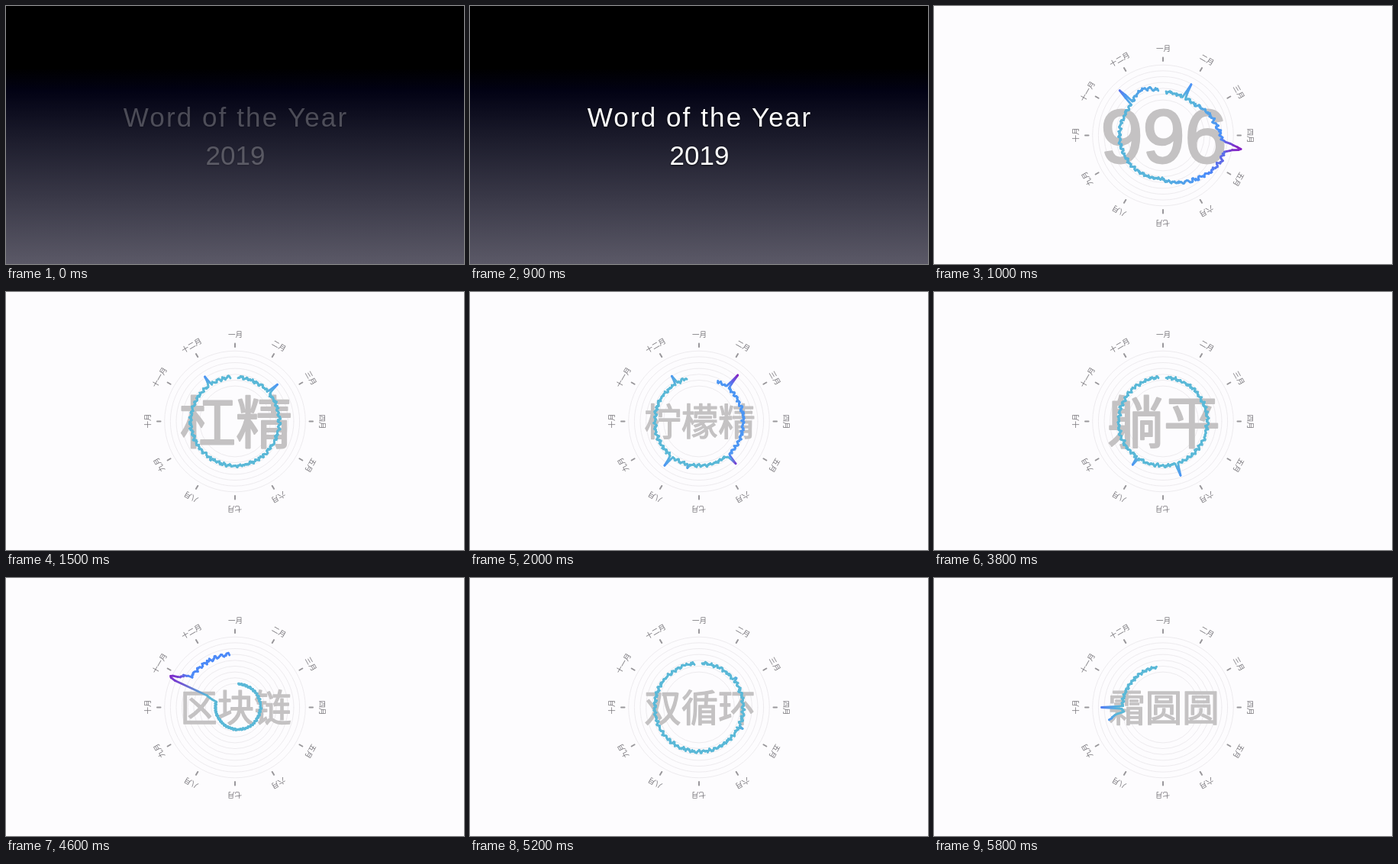
Animation, 600 px wide and 338 px high, one loop 5900 ms. Source, as an HTML page with a canvas:

```html
<!DOCTYPE html>
<html lang="zh">
<head>
<meta charset="utf-8">
<style>
html, body { margin: 0; width: 100%; height: 100%; overflow: hidden; background: #fdfcfe; }
canvas { display: block; width: 600px; height: 338px; }
</style>
</head>
<body>
<canvas id="stage"></canvas>
<script>
const LOOP = 5900, TICK = 100, INTRO = 1000, CX = 300, CY = 169.5;
const CJK = '"Noto Sans CJK SC", "Noto Sans CJK", sans-serif';
const LATIN = '"Liberation Sans", Arial, sans-serif';
const canvas = document.getElementById('stage');
const ctx = canvas.getContext('2d');
const scale = window.devicePixelRatio || 1;
canvas.width = 600 * scale;
canvas.height = 338 * scale;

const months = '一 二 三 四 五 六 七 八 九 十 十一 十二'.split(' ');

// Every star holds a word for one more tick.
const words = ('996 断舍离 内卷 夸夸群 打工人 杠精 彩虹屁 佛系** 柠檬精** 斜杠 盘他 社畜 种草 断层 带货* ' +
  '硬核** 上头** 真香 锦鲤 躺平 秃头 下沉** 台风** 区块链** 养生 新基建* 双循环 云养猫* ' +
  '早八人 直播间 小确幸 霜圆圆').split(' ');

// Peaks are [degrees, height, half width]; base and tint may depend on the angle.
const curves = {
  '996': { base: () => 57, lo: 55, hi: 97,
    peaks: [[29, 17], [112, 27, 70], [100, 22, 6], [316, 22, 2], [335, 10, 25]] },
  '柠檬精': { from: 25, to: 344, tint: a => a < 140 ? .4 : 0,
    peaks: [[40, 22], [139, 16], [194, 6], [218, 14], [329, 12]] },
  '硬核': { from: -6, to: 346, peaks: [[12, 11], [327, 3, 4], [345, 7]] },
  '台风': { peaks: [[221, 99]] },
  '区块链': { from: 8, rings: 9, lo: 45, hi: 93, peaks: [[296, 22, 9]],
    base: a => a < 294 ? 29.5 + 4 * Math.cos((a - 80) * Math.PI / 180) : 70 },
  '霜圆圆': { from: 257, to: 351, base: () => 53, hi: 100, peaks: [[257, 20, 7], [270, 29]] }
};

function rand(n) {
  const x = Math.sin(n * 12.9898 + 4.137) * 43758.5453;
  return x - Math.floor(x);
}

// A quiet year with two bursts; the last words only turn up in autumn.
function quietCurve(seed, time) {
  const from = time >= 5300 ? 250 : 4;
  const height = time >= 4900 ? 5 : 14;
  const peaks = [1, 2].map(i => [Math.round(from + 10 + rand(seed * 7 + i) * (330 - from)), height]);
  return { from, peaks };
}

function ramp(v) {
  const stops = [[90, 184, 215], [74, 142, 250], [132, 36, 196]];
  const t = Math.max(0, Math.min(1, v)) * 2, i = Math.min(1, Math.floor(t));
  const rgb = stops[i].map((c, k) => Math.round(c + (stops[i + 1][k] - c) * (t - i)));
  return `rgb(${rgb})`;
}

// One point per degree, with a weekly ripple and some daily noise.
function trace({ from = 4, to = 354, lo = 58, hi = 92, base = () => 58, tint = () => 0, peaks }, seed) {
  const points = [];
  for (let a = from; a <= to; a++) {
    let r = base(a);
    for (const [at, height, width = 1.5] of peaks) {
      r += height * Math.max(0, 1 - Math.abs(a - at) / width);
    }
    const ripple = .018 * Math.sin(a * Math.PI * 2 / 7) + .045 * (rand(seed * 400 + a) - .5);
    const angle = a * Math.PI / 180, wobbly = r * (1 + ripple);
    points.push({
      x: CX + wobbly * Math.sin(angle),
      y: CY - wobbly * Math.cos(angle),
      color: ramp((r - lo) / (hi - lo) + tint(a))
    });
  }
  return points;
}

let clock = INTRO;
const scenes = words.map((entry, i) => {
  const word = entry.replace(/\*/g, ''), time = clock;
  clock += TICK * (1 + entry.length - word.length);
  const curve = curves[word] || quietCurve(i + 1, time);
  return { time, word, rings: curve.rings || 7, points: trace(curve, i + 1) };
});

function line(x1, y1, x2, y2, style, width) {
  ctx.strokeStyle = style;
  ctx.lineWidth = width;
  ctx.beginPath();
  ctx.moveTo(x1, y1);
  ctx.lineTo(x2, y2);
  ctx.stroke();
}

function drawDial(rings) {
  ctx.strokeStyle = '#ebe9ed';
  ctx.lineWidth = .9;
  for (let i = 0; i < rings; i++) {
    ctx.beginPath();
    ctx.arc(CX, CY, 92.3 - i * 7.65, 0, Math.PI * 2);
    ctx.stroke();
  }
  ctx.font = `300 9.6px ${CJK}`;
  months.forEach((m, i) => {
    ctx.save();
    ctx.translate(CX, CY);
    ctx.rotate(i * Math.PI / 6);
    line(0, -97.5, 0, -102, '#99979b', 2);
    ctx.fillStyle = '#77757a';
    ctx.fillText(m + '月', 0.5, -111);
    ctx.restore();
  });
}

function drawWord(word) {
  const digits = /\d/.test(word);
  const size = digits ? 99 : word.length === 2 ? 74 : 48.5;
  const baseline = CY + size * (digits ? .36 : .39);
  ctx.fillStyle = ctx.strokeStyle = '#c4c2c3';
  ctx.font = `${size}px ${digits ? LATIN : CJK}`;
  ctx.lineWidth = size * .028;
  ctx.strokeText(word, 301, baseline);
  ctx.fillText(word, 301, baseline);
}

function drawCurve(points) {
  for (let i = 1; i < points.length; i++) {
    const p = points[i - 1], q = points[i];
    const g = ctx.createLinearGradient(p.x, p.y, q.x, q.y);
    g.addColorStop(0, p.color);
    g.addColorStop(1, q.color);
    line(p.x, p.y, q.x, q.y, g, 2.8);
  }
}

function drawTitle(t) {
  const g = ctx.createLinearGradient(0, 0, 0, 338);
  g.addColorStop(.24, '#000');
  g.addColorStop(.33, '#020214');
  g.addColorStop(.5, '#1a1a2a');
  g.addColorStop(1, '#5b5967');
  ctx.fillStyle = g;
  ctx.fillRect(0, 0, 600, 338);
  ctx.save();
  ctx.globalAlpha = Math.min(1, .26 + .74 * t / 500);
  ctx.shadowColor = 'rgba(0,0,0,.7)';
  ctx.shadowBlur = 3 * scale;
  ctx.shadowOffsetY = scale;
  ctx.fillStyle = '#fff';
  ctx.font = `35px ${LATIN}`;
  ctx.letterSpacing = '2.1px';
  ctx.fillText('Word of the Year', 301, 158);
  ctx.letterSpacing = '0px';
  ctx.fillText('2019', 300.5, 208);
  ctx.restore();
}

function draw(now) {
  const t = Math.floor(now % LOOP / TICK) * TICK;
  ctx.setTransform(scale, 0, 0, scale, 0, 0);
  ctx.textAlign = 'center';
  ctx.lineCap = ctx.lineJoin = 'round';
  const scene = scenes.filter(s => s.time <= t).pop();
  if (!scene) return drawTitle(t);
  ctx.fillStyle = '#fdfcfe';
  ctx.fillRect(0, 0, 600, 338);
  drawDial(scene.rings);
  drawWord(scene.word);
  drawCurve(scene.points);
}

const begin = performance.now();
function tick() {
  draw(performance.now() - begin);
  requestAnimationFrame(tick);
}
tick();
</script>
</body>
</html>
```
